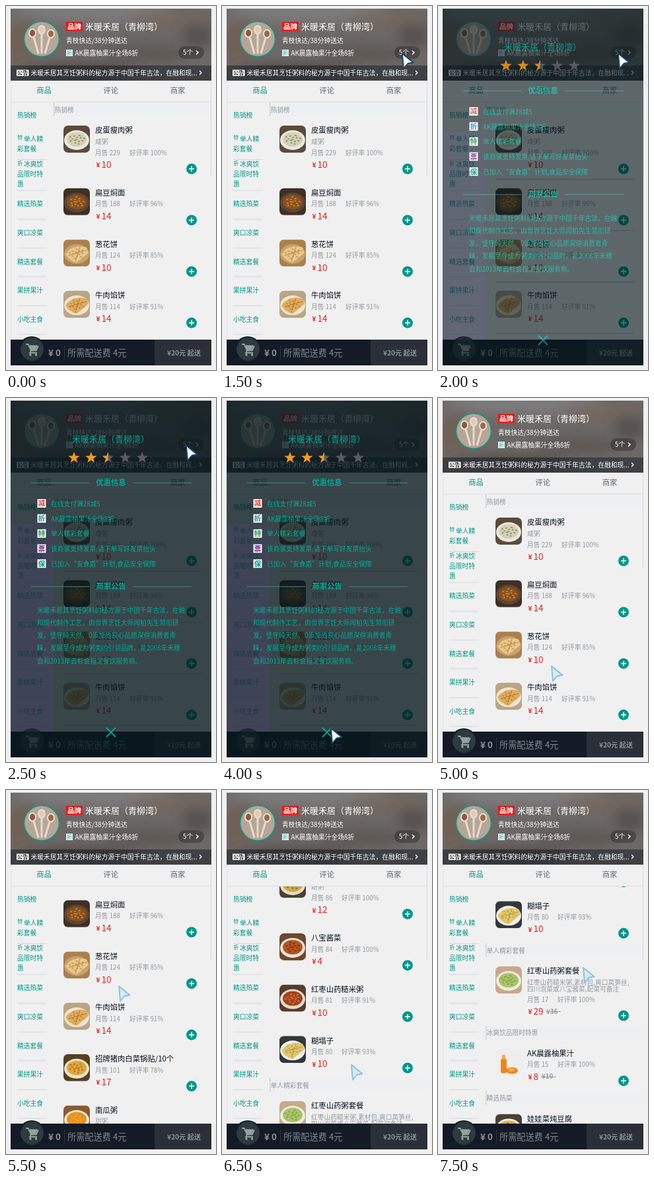
Recreate the animation shown at these times as an HTML page. Size 318 by 551 pixels, loop 8 s.

```html
<!DOCTYPE html>
<html lang="zh-CN">
<head>
<meta charset="utf-8">
<title>点餐页面</title>
<style>
html, body { margin: 0; width: 100%; height: 100%; overflow: hidden; background: #f0f0f0; }
svg { display: block; }
text { font-family: "Noto Sans CJK SC", "Noto Sans CJK", "Noto Sans", sans-serif; white-space: pre; }
</style>
</head>
<body>
<svg id="stage" width="318" height="551" viewBox="0 0 318 551">
  <defs>
    <clipPath id="headClip"><rect x="7" y="4" width="304" height="109"/></clipPath>
    <clipPath id="listClip"><rect x="72" y="146" width="239" height="359"/></clipPath>
    <clipPath id="faceClip"><circle cx="54" cy="50" r="26"/></clipPath>
    <clipPath id="picClip"><rect width="40" height="41" rx="7"/></clipPath>
    <clipPath id="halfClip"><rect x="-10" y="-10" width="10" height="20"/></clipPath>
    <filter id="soft" x="-50%" y="-50%" width="200%" height="200%"><feGaussianBlur stdDeviation="9"/></filter>
  </defs>
  <g id="list" clip-path="url(#listClip)"><g id="goods"></g></g>
  <g id="frame"></g>
  <g id="head"></g>
  <g id="foot"></g>
  <g id="detail"></g>
  <path id="cursor" d="M0 0L16.500 13.500L8.500 15L2 22.500Z" stroke-width="1.800" stroke-linejoin="round"/>
</svg>
<script>
const NS = 'http://www.w3.org/2000/svg';
const TEAL = '#009688', GREY = '#93999f', RED = '#f01e1e';
const S = 9.75, M = 11.35, L = 13;
const $ = id => document.getElementById(id);

function add(parent, tag, attrs, body) {
  const el = document.createElementNS(NS, tag);
  for (const k in attrs) el.setAttribute(k, attrs[k]);
  if (body !== undefined) el.textContent = body;
  parent.appendChild(el);
  return el;
}
// y is the middle of the glyphs
function text(p, x, y, str, size, fill, more) {
  return add(p, 'text', { x, y: y + size * 0.38, 'font-size': size, fill, ...more }, str);
}
const rect = (p, x, y, width, height, fill, more) => add(p, 'rect', { x, y, width, height, fill, ...more });
const oval = (p, cx, cy, rx, ry, fill, more) => add(p, 'ellipse', { cx, cy, rx, ry, fill, ...more });
const path = (p, d, more) => add(p, 'path', { d, fill: 'none', ...more });
const group = (p, x, y, more) => add(p, 'g', { transform: `translate(${x} ${y})`, ...more });
const BOLD = { 'font-weight': 700 }, MID = { 'text-anchor': 'middle' };

const SHOP = '米暖禾居（青柳湾）';
const OFFER = 'AK晨露柚果汁';
const NOTICE = [
  '米暖禾居其烹饪粥料的秘方源于中国千年古法，在融',
  '和现代制作工艺，由世界烹饪大师闻柏先生领衔研',
  '发。坚守纯天然、0添加的良心品质深得消费者青',
  '睐，发展至今成为粥类的引领品牌。是2008年禾穗',
  '会和2013年云杉会指定餐饮服务商。'
];

// picture: shape, backdrop, plate, food, garnish
const MENU = [
  { title: '热销榜', foods: [
    ['皮蛋瘦肉粥', 229, 100, 10, ['咸粥'], ['bowl', '#5c4a3c', '#ece8e0', '#d6d0b8', '#7a8a4a']],
    ['扁豆焖面', 188, 96, 14, [], ['bowl', '#3f3026', '#5c4534', '#8a4f1c', '#d59a45']],
    ['葱花饼', 124, 85, 10, [], ['slice', '#a9804e', '#c9a06a', '#e6c88f', '#c08a45']],
    ['牛肉馅饼', 114, 91, 14, [], ['slice', '#b9a586', '#eee3d0', '#dfae60', '#b97a30']],
    ['招牌猪肉白菜锅贴/10个', 101, 78, 17, [], ['bowl', '#54401f', '#e8e0d0', '#e0a83a', '#a8661c']],
    ['南瓜粥', 91, 100, 9, ['甜粥'], ['bowl', '#8b5a32', '#f0e4d0', '#e8901c', '#f3b04a']],
    ['红豆薏米粥', 86, 100, 12, ['甜粥'], ['bowl', '#4a3f34', '#e6dcc0', '#c9a84a', '#8a5a2c']],
    ['八宝酱菜', 84, 100, 4, [], ['bowl', '#70462c', '#e8e4de', '#b5541e', '#6a2a14']],
    ['红枣山药糙米粥', 81, 91, 10, [], ['bowl', '#5a3a28', '#e4dcd0', '#a5401c', '#dd8a3c']],
    ['糊塌子', 80, 93, 10, [], ['slice', '#34373b', '#eeeeea', '#e3c56c', '#b8a040']]
  ] },
  { title: '单人精彩套餐', foods: [
    ['红枣山药粥套餐', 17, 100, 29, ['红枣山药糙米粥,素材包,爽口莴笋丝,', '四川泡菜或八宝酱菜,配菜可备注'], ['bowl', '#c7a98a', '#eeeae2', '#a9c46a', '#7a9a3c'], 36]
  ] },
  { title: '冰爽饮品限时特惠', foods: [
    [OFFER, 15, 100, 8, [], ['bottle', '#f0eeec', '#f0eeec', '#ee8420', '#f4a848'], 10]
  ] },
  { title: '精选热菜', foods: [
    ['娃娃菜炖豆腐', 43, 92, 17, [], ['bowl', '#4a3f38', '#eeeae4', '#e0b050', '#c8402c']]
  ] }
];

function picture(p, x, y, [shape, back, plate, food, bits], seed) {
  const g = add(group(p, x, y), 'g', { 'clip-path': 'url(#picClip)' });
  rect(g, 0, 0, 40, 41, back);
  if (shape === 'bottle') {
    rect(g, 8, 15, 9, 22, food, { rx: 3 });
    rect(g, 10, 9, 5, 7, bits, { rx: 1 });
    oval(g, 25, 33, 9, 5, food);
    oval(g, 24, 32, 5, 3, bits);
    return;
  }
  oval(g, 20, 22, 19, 15, plate);
  if (shape === 'slice') {
    path(g, 'M3 22Q14 6 35 12L38 20L20 35Q8 32 3 22Z', { fill: food });
    path(g, 'M8 24L36 16M18 33L25 11', { stroke: bits, 'stroke-width': 1 });
  } else {
    oval(g, 20, 21, 15, 11, food);
  }
  for (let i = 0; i < 14; i++) {
    const a = i * 2.4 + seed, r = Math.sqrt(i / 14);
    oval(g, 20 + 12 * r * Math.cos(a), 21 + 8 * r * Math.sin(a), 1.8, 1.1, bits, { opacity: 0.75 });
  }
}

function buildGoods() {
  const g = $('goods');
  const rules = add(g, 'g', { id: 'rules' });
  let y = 157, seed = 0;
  for (const { title, foods } of MENU) {
    rect(g, 72, y - 11, 239, 21, '#eeeff0');
    rect(g, 72, y - 11, 1.5, 21, '#d3d5e0');
    text(g, 73.5, y, title, S, GREY);
    y += 31;
    foods.forEach(([name, sold, score, price, desc, pic, old], i) => {
      picture(g, 87, y - 7, pic, seed++);
      text(g, 135, y, name, M, '#07111b');
      desc.forEach((line, n) => text(g, 135, y + 17 + n * 10.5, line, S, GREY));
      const low = y + [0, 17, 26][desc.length];
      text(g, 135, low + 17, '月售 ' + sold, S, GREY);
      text(g, sold > 99 ? 187 : 181, low + 17, `好评率 ${score}%`, S, GREY);
      text(g, 136.5, low + 35.5, '¥', 10, RED, BOLD);
      text(g, 144.5, low + 35, price, 13.5, RED);
      if (old) {
        const x = price > 9 ? 164 : 157;
        text(g, x, low + 35, '¥' + old, S, GREY, BOLD);
        rect(g, x - 1, low + 35, 23, 1, GREY);
      }
      oval(g, 281, low + 41.5, 8, 8, TEAL);
      path(g, `M277 ${low + 41.5}h8m-4 -4v8`, { stroke: '#fff', 'stroke-width': 1.6 });
      y = low + 77.7;
      if (i < foods.length - 1) rect(rules, 87, y - 21, 209, 1, '#07111b');
    });
    y -= 10;
  }
}

function buildFrame() {
  const g = $('frame');
  rect(g, 7, 113, 1, 392, '#dfe1e6');
  rect(g, 310, 113, 1, 145, '#d5d7de');
  rect(g, 7, 145, 304, 1, '#dcdfe2');
  ['商品', '评论', '商家'].forEach((s, i) =>
    text(g, 57.5 + i * 101.3, 128, s, M, i ? '#5d666e' : TEAL, MID));
  const side = (x, y, s) => text(g, x, y, s, S, TEAL);
  side(17, 165, '热销榜');
  text(g, 17.5, 199, '特', 7.5, TEAL);
  side(27, 201, '单人精');
  side(17, 216.5, '彩套餐');
  text(g, 17.5, 238, '折', 7.5, TEAL);
  side(27, 239, '冰爽饮');
  side(17, 254.5, '品限时特');
  side(17, 269, '惠');
  ['精选热菜', '爽口凉菜', '精选套餐', '果拼果汁', '小吃主食'].forEach((s, i) =>
    side(17, 299.5 + i * 43.7, s));
  for (let i = 0; i < 7; i++) rect(g, 17, 232 + (i ? 3 : 0) + i * 43.6, 45, 1, '#d3d6df');
}

function buildHead() {
  const g = $('head');
  const bg = add(g, 'g', { 'clip-path': 'url(#headClip)' });
  rect(bg, 7, 4, 304, 109, '#6c6866');
  const blur = { filter: 'url(#soft)' };
  oval(bg, 130, 8, 120, 18, '#7c7a7b', blur);
  oval(bg, 30, 55, 30, 28, '#716054', blur);
  oval(bg, 250, 22, 60, 10, '#75675d', blur);
  oval(bg, 290, 45, 24, 18, '#575150', blur);
  oval(bg, 210, 72, 70, 14, '#5f5854', blur);
  oval(bg, 110, 100, 90, 12, '#4f4743', blur);
  rect(bg, 7, 90, 304, 23, '#07111b', { opacity: 0.45 });

  const face = add(g, 'g', { 'clip-path': 'url(#faceClip)' });
  rect(face, 27, 23, 54, 54, '#b7a596');
  for (const [x, y, tone] of [[40, 41, '#8a5a3c'], [54, 36, '#e0cdb8'], [68, 42, '#9a6a48']]) {
    path(face, `M${x} ${y}L${54 + (x - 54) * 0.35} 72`, { stroke: '#e6dacd', 'stroke-width': 3 });
    oval(face, x, y, 6, 7, '#eadfd3');
    oval(face, x, y, 4, 5, tone);
  }
  add(g, 'circle', { cx: 54, cy: 50, r: 26.5, fill: 'none', stroke: '#0a9c8c', 'stroke-width': 1.5 });

  rect(g, 91, 24, 25, 14, '#e01c1c', { rx: 1 });
  text(g, 103.5, 31, '品牌', 10.5, '#fff', { ...BOLD, ...MID });
  text(g, 120, 31, SHOP, L, '#fff', { 'font-weight': 500 });
  text(g, 91, 52, '青枝快达/38分钟送达', S, '#fff');
  rect(g, 91, 66, 10, 10, '#e8f6f8');
  text(g, 96, 71, '折', 8, '#2a9db0', MID);
  text(g, 104.5, 71.5, OFFER + '全场8折', S, '#fff', { 'font-weight': 500 });
  rect(g, 261, 61, 39, 19, '#000', { rx: 9.5, opacity: 0.28 });
  text(g, 268, 70.5, '5个', S, '#fff', { 'font-weight': 500 });
  path(g, 'M288 67.500l3 3l-3 3M293 98l3 3l-3 3', { stroke: '#fff', 'stroke-width': 1.4 });
  rect(g, 16, 96.5, 18.5, 9.5, '#fff', { rx: 1 });
  text(g, 25.2, 101.2, '公告', 8, '#333', { ...BOLD, ...MID });
  text(g, 37.5, 101.5, NOTICE[0] + '和现...', S, '#fff');
}

function buildFoot() {
  const g = $('foot');
  rect(g, 7, 505, 304, 39, '#141a26');
  rect(g, 225, 505, 86, 39, '#2a2f38');
  oval(g, 39, 520, 20, 20, '#141a26');
  oval(g, 39.5, 519.5, 17.5, 17.5, '#2b3b40');
  path(g, 'M30 512h3.500l4.500 9.500h7.500l3.500 -6.500M38 521.500l-2 3.500h11', { stroke: '#98a0a2', 'stroke-width': 1.8 });
  path(g, 'M34.500 513.500h14l-4 8h-7z', { fill: '#98a0a2' });
  oval(g, 37, 528, 1.8, 1.8, '#98a0a2');
  oval(g, 45.5, 528, 1.8, 1.8, '#98a0a2');
  text(g, 64, 524.5, '¥ 0', 13.5, '#8b9399', BOLD);
  rect(g, 88, 514, 1, 20, '#333a43');
  text(g, 93, 524.5, '所需配送费 4元', 13.2, '#7f8a8e');
  text(g, 269.5, 525, '¥20元 起送', 10.2, '#8b9399', { ...BOLD, ...MID });
}

function star(p, x, y, fill, half) {
  let d = '';
  for (let i = 0; i < 10; i++) {
    const a = i * Math.PI / 5, r = i % 2 ? 3.8 : 9;
    d += (i ? 'L' : 'M') + (r * Math.sin(a)).toFixed(2) + ' ' + (-r * Math.cos(a)).toFixed(2);
  }
  path(group(p, x, y), d + 'Z', { fill, ...(half && { 'clip-path': 'url(#halfClip)' }) });
}

function buildDetail() {
  const g = $('detail'), bright = '#00ab98';
  rect(g, 7, 4, 304, 540, '#07181c', { opacity: 0.79 });
  rect(g, 7, 190, 65, 315, '#4c4270', { id: 'tint', opacity: 0.3 });
  text(g, 158.5, 62, SHOP, L, bright, { ...MID, 'font-weight': 500 });
  for (let i = 0; i < 5; i++) {
    const x = 103 + i * 25.8;
    star(g, x, 90.5, i < 2 ? '#f59a1c' : '#5a5a66');
    if (i === 2) star(g, x, 90.5, '#f59a1c', true);
  }
  const heading = (y, s) => {
    text(g, 159, y, s, M, bright, { ...MID, ...BOLD });
    rect(g, 38, y, 88, 1, '#4d7f7c');
    rect(g, 192, y, 89, 1, '#4d7f7c');
  };
  heading(128, '优惠信息');
  [['减', '#e8413c', '在线支付满28减5'],
   ['折', '#2f86b8', OFFER + '全场8折'],
   ['特', '#2f9a48', '单人精彩套餐'],
   ['票', '#8a1c9a', '该商家支持发票,请下单写好发票抬头'],
   ['保', '#0a9c84', '已加入“安食盾”计划,食品安全保障']
  ].forEach(([mark, tone, s], i) => {
    const y = 159.5 + i * 22.8;
    rect(g, 47.5, y - 6.5, 13, 13, '#eef6f5');
    text(g, 54, y, mark, 10.5, tone, { ...BOLD, ...MID });
    text(g, 68, y + 0.5, s, S, bright);
  });
  heading(285, '商家公告');
  NOTICE.forEach((s, i) => text(g, 47, 321 + i * 19.25, s, S, bright));
  path(g, 'M152 499l14 14m0 -14l-14 14', { stroke: bright, 'stroke-width': 1.8 });
}

buildGoods();
buildFrame();
buildHead();
buildFoot();
buildDetail();

// one row per half second: sheet opacity, list scroll, pointer x, pointer y
const STEPS = [
  [0, 0, -40, 0], [0, 0, 285, 130], [0, 0, 273, 79], [0, 0, 273, 72],
  [0.8, 0, 273, 72], [1, 0, 273, 72], [1, 0, 193, 253], [1, 0, 164, 439],
  [1, 0, 165, 500], [0.23, 0, 163, 505], [0, 0, 172, 406], [0, 109, 171, 297],
  [0, 340, 182, 352], [0, 559, 196, 416], [0, 640, 210, 356], [0, 763, 220, 269]
];

function draw() {
  const n = Math.floor(performance.now() % 8000 / 500);
  const [fade, scroll, x, y] = STEPS[n];
  const pale = n >= 10, closing = n === 9;
  $('detail').setAttribute('opacity', fade);
  $('tint').setAttribute('fill', closing ? '#2fd8c8' : '#4c4270');
  $('rules').setAttribute('opacity', fade ? 0.25 : 0);
  $('goods').setAttribute('transform', `translate(0 ${-scroll})`);
  const c = $('cursor');
  c.setAttribute('transform', `translate(${x} ${y})`);
  c.setAttribute('fill', pale ? '#d6eaf6' : '#f4f9fc');
  c.setAttribute('stroke', pale ? '#84bfe2' : '#1d4468');
  requestAnimationFrame(draw);
}
draw();
</script>
</body>
</html>
```
